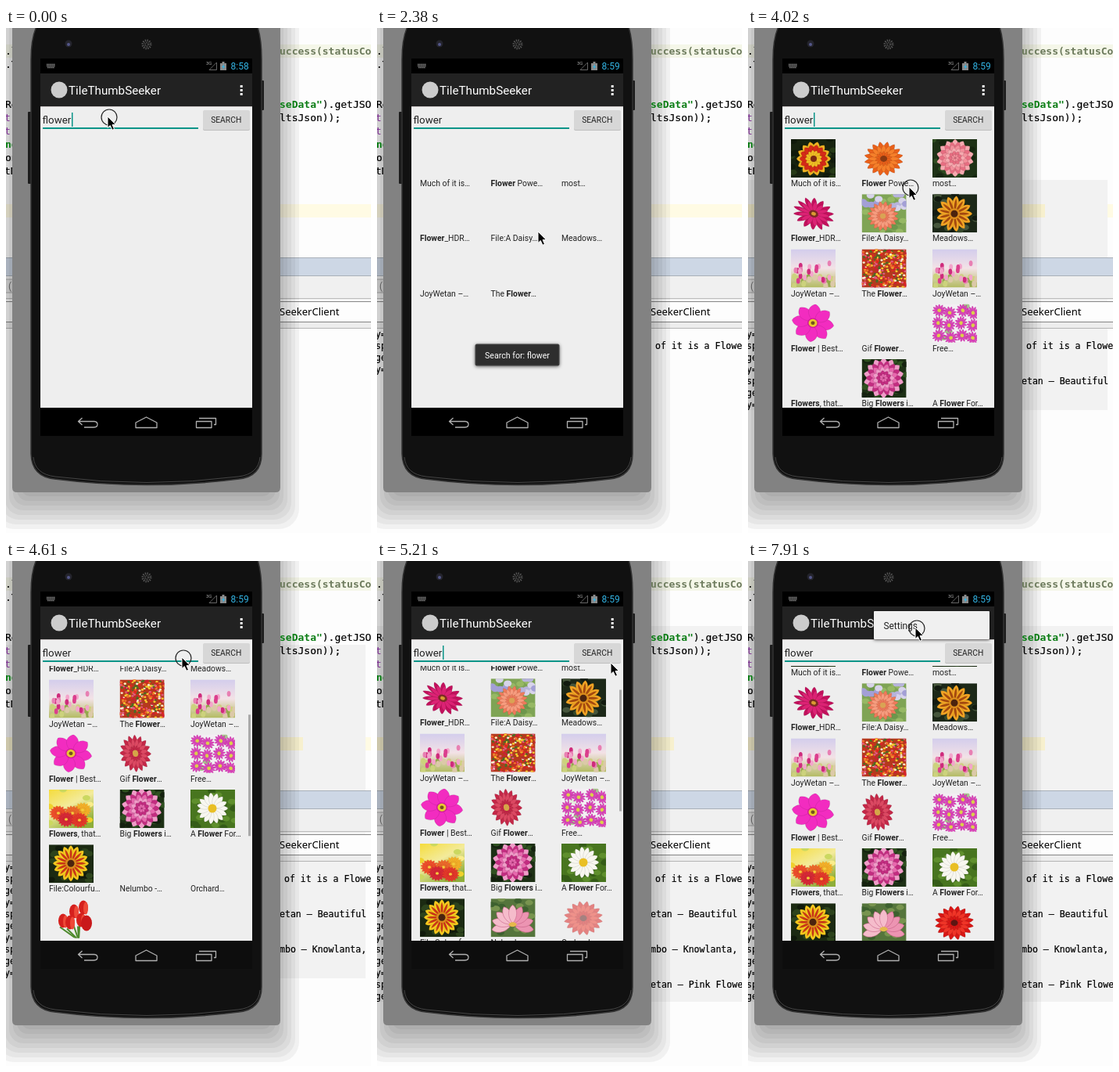
Write an HTML page that moves like this. It is 467x645 px and loops after 8 s.

```html
<!DOCTYPE html>
<html lang="en">
<head>
<meta charset="utf-8">
<title>Image search on a phone</title>
<style>
html, body { margin: 0; width: 100%; height: 100%; overflow: hidden; background: #fdfdfd; }
svg { display: block; width: 467px; height: 645px; font-family: Roboto, sans-serif; fill: #222; }
.code, .log { fill: #000; stroke: #000; stroke-width: .2; }
.code { font: 13px "DejaVu Sans Mono", monospace; }
.log { font: 11.55px "DejaVu Sans Mono", monospace; }
.str { font-weight: bold; fill: #0a7d14; stroke: none; }
.key { fill: #7a2a90; stroke: none; }
.b { font-weight: 700; }
.line { fill: none; stroke: #b0b0b0; stroke-width: 1.3; stroke-linejoin: round; }
#toast, #menu { filter: drop-shadow(0 1px 2px rgba(0,0,0,.6)); }
</style>
</head>
<body>
<svg viewBox="0 0 467 645">
  <defs>
    <clipPath id="view"><rect x="44" y="134" width="271" height="351"/></clipPath>
    <clipPath id="cell"><rect width="57" height="49"/></clipPath>
    <linearGradient id="meadow" x2="0" y2="1">
      <stop stop-color="#d3cdec"/><stop offset=".5" stop-color="#f3e2e6"/><stop offset="1" stop-color="#b3bb62"/>
    </linearGradient>
    <linearGradient id="spring" x2=".6" y2="1">
      <stop stop-color="#f5dc3c"/><stop offset=".5" stop-color="#f3eb9c"/><stop offset="1" stop-color="#8eae3a"/>
    </linearGradient>
  </defs>

  <!-- editor behind the phone -->
  <rect width="467" height="645" fill="#fdfdfd"/>
  <rect y="21" width="467" height="17" fill="#f5f7e9"/>
  <rect y="225" width="467" height="17" fill="#fffbe4"/>
  <g id="shade">
    <rect id="pane" fill="#f2f2f2"/>
    <rect y="225" width="380" height="17" fill="#f7f0ce"/>
  </g>
  <rect y="293" width="467" height="24" fill="#cdd7e5"/>
  <path d="M0 293.5H467M0 316.5H467" stroke="#a9b0b9"/>
  <rect y="317" width="467" height="30" fill="#f0f0f0"/>
  <path d="M0 345.5H467" stroke="#bbb"/>
  <rect y="349" width="467" height="27" fill="#fdfdfd"/>
  <rect y="376" width="467" height="8" fill="#ededed"/>
  <path d="M0 349.5H467M0 375.5H467" stroke="#858585"/>
  <path d="M0 383.5H467" stroke="#b5b5b5"/>
  <rect x="-4" y="321" width="30" height="17" rx="4" fill="#e2e2e2" stroke="#aaa"/>
  <text x="3" y="334" font-size="12" style="fill:#777">(</text>
  <g id="shadow"></g>
  <text x="350" y="367" style="font:13px 'Noto Sans',sans-serif;fill:#000">SeekerClient</text>
  <g class="code">
    <text x="350" y="34" style="fill:#6c7a5c;stroke:none;font-weight:bold">uccess(statusCo</text>
    <text x="350" y="102"><tspan class="str">seData"</tspan>).getJSO</text>
    <text x="350" y="119">ltsJson));</text>
    <text x="-1" y="34">.l</text><text x="-1" y="51">.T</text>
    <text x="-1" y="102">Re</text>
    <text x="-2" y="119" class="key">t</text><text x="-2" y="136" class="key">t</text>
    <text x="-1" y="153" class="str">ng</text>
    <text x="-1" y="170">on</text><text x="-2" y="187">tN</text>
  </g>
  <g id="logs" class="log"></g>

  <!-- phone -->
  <path d="M8-60H351V587Q351 593 345 593H14Q8 593 8 587Z" fill="#828282"/>
  <rect x="28" y="107" width="5" height="92" rx="1" fill="#1c1c1c"/>
  <rect x="326" y="67" width="4" height="38" rx="1" fill="#1c1c1c"/>
  <path d="M40-4Q32 12 32 40V544Q33 573 62 576Q180 591 298 576Q327 573 327 544V40Q327 12 321-4Z" fill="#111" stroke="#333" stroke-width="1.5"/>
  <path d="M35 548Q37 570 63 573Q180 588 297 573Q323 570 325 548" fill="none" stroke="#444"/>
  <circle cx="80" cy="20" r="4.5" fill="#24242c"/><circle cx="80" cy="21" r="2" fill="#54578a"/>
  <circle cx="180" cy="21" r="5" fill="none" stroke="#555" stroke-width="3" stroke-dasharray="1.3 1.3"/>
  <circle cx="180" cy="21" r="2" fill="none" stroke="#555" stroke-width="2" stroke-dasharray="1 1"/>

  <rect x="44" y="39" width="271" height="19" fill="#000"/>
  <path d="M52 46.5H63M52 48.5H63M53 50.5H62" stroke="#8a8a8a" stroke-width="1.4" stroke-dasharray="1.5 .6"/>
  <text x="256" y="47" font-size="6" style="fill:#aaa">3G</text>
  <path d="M260 53.5L269.5 44V53.5Z" fill="none" stroke="#666"/>
  <path d="M274 45H276.5V43H279.5V45H282V54H274Z" fill="#8a8a8a"/>
  <path d="M279 46L276 50H278L277 53L280.5 49H278.5Z" fill="#33b5e5"/>
  <text id="clock" x="287.5" y="53" font-size="12" style="fill:#33b5e5"></text>

  <rect x="44" y="58" width="271" height="42" fill="#222"/>
  <circle cx="68" cy="79" r="10.5" fill="#ccc"/>
  <text x="80" y="85" font-size="15.2" style="fill:#fff">TileThumbSeeker</text>
  <path d="M299.7 73h3v3h-3zM299.7 78h3v3h-3zM299.7 83h3v3h-3z" fill="#fff"/>

  <rect x="44" y="100" width="271" height="385" fill="#eee"/>
  <path d="M44 100.5H315" stroke="#c9c4c4"/>
  <text x="46.5" y="121.6" font-size="13.3">flower</text>
  <rect x="47" y="127" width="199" height="2" fill="#0b9488"/>
  <rect id="caret" x="84" y="108" width="1.5" height="18" fill="#0b9488"/>
  <rect x="252" y="106" width="60" height="25" rx="2" fill="#bfbfbf"/>
  <rect id="button" x="252" y="105" width="60" height="25" rx="2"/>
  <text x="281.7" y="121.3" font-size="10.3" text-anchor="middle">SEARCH</text>
  <g clip-path="url(#view)"><g id="grid" font-size="10.4"></g></g>
  <rect id="bar" x="310" width="3" height="155" fill="#aaa"/>

  <rect id="nav" x="44" y="485" width="271" height="36"/>
  <g class="line">
    <path d="M97.5 498L92.5 502.5L97.5 507M92.5 502.5H113Q117 503 117 506.2Q117 510 112 510H100"/>
    <path d="M166 504L179.5 497L193 504V510.5H166Z"/>
    <path d="M243.5 502.5H263V510.5H243.5ZM247 498.5H268.5V506.5H266"/>
  </g>

  <g id="toast">
    <rect x="126" y="404" width="107" height="27" rx="1.5" fill="#2e2e2e" stroke="#464646"/>
    <text x="179.5" y="422" font-size="10.6" text-anchor="middle" style="fill:#fff">Search for: flower</text>
  </g>
  <g id="menu">
    <rect x="161" y="64" width="148" height="36" rx="1" fill="#f0f0f0"/>
    <text x="173.5" y="87" font-size="11.9">Settings</text>
  </g>
  <g id="mouse">
    <circle id="ring" cx="2" cy="1" r="10" fill="none" stroke="#222" stroke-width="1.2"/>
    <path d="M0 0V14.5L3.3 11.5L5.9 17.3L8.5 16.1L6 10.6H10.5Z" fill="#000" stroke="#fff"/>
  </g>
</svg>
<script>
const $ = id => document.getElementById(id);
const set = (id, attrs) => { for (const k in attrs) $(id).setAttribute(k, attrs[k]); };
const show = (id, on) => set(id, { visibility: on ? 'visible' : 'hidden' });

let seed = 11;
const rnd = () => (seed = seed * 16807 % 2147483647) / 2147483647;
const times = (n, f) => Array.from({ length: n }, (_, i) => f(i)).join('');
const pick = list => list[Math.floor(rnd() * list.length)];

// the window shadow falls off in visible steps
$('shadow').innerHTML = times(8, i => {
  const grow = 24 - i * 5;
  return `<rect x="${8 - grow}" y="-80" width="${343 + 2 * grow}" height="${720 - i * 6}" rx="${26 - i * 2}" fill-opacity=".047" fill="#000"/>`;
});

// ---- pictures, each 57 x 49 ----
const bg = c => `<rect width="57" height="49" fill="${c}"/>`;
const dot = (x, y, rx, ry, c) => `<ellipse cx="${x.toFixed(1)}" cy="${y.toFixed(1)}" rx="${rx}" ry="${ry}" fill="${c}"/>`;
// a pointed petal lying on the x axis, from the centre out to r
const petal = (r, w) => `M${r * .12} 0C${r * .45} ${-w * 1.5} ${r * .85} ${-w * 1.2} ${r} 0C${r * .85} ${w * 1.2} ${r * .45} ${w * 1.5} ${r * .12} 0`;
const ring = (n, r, w, c, k) => n
  ? times(n, i => `<path d="${petal(r, w)}" fill="${c}" stroke="#000" stroke-opacity=".18" stroke-width=".5" transform="rotate(${(i + k * .5) * 360 / n})"/>`)
  : `<circle r="${r}" fill="${c}"/>`;
// layers: [petals, radius, petal half-width, colour]; no petals means a disc
const bloom = (x, y, layers, tilt = 0, sy = 1, size = 1) =>
  `<g transform="translate(${x} ${y}) rotate(${tilt}) scale(${size} ${size * sy})">${layers.map((l, k) => ring(...l, k)).join('')}</g>`;
const blur = (colors, n = 26) => times(n, () => dot(rnd() * 57, rnd() * 49, 5, 3.5, pick(colors)));

const dahlia = (a, b, c) => [[0, 16, 0, a], [14, 24, 5, c], [14, 21, 3.6, a], [12, 17, 3.6, b], [11, 13, 3, c], [9, 9, 2.4, a], [7, 5, 1.6, b]];
const gerbera = (a, b, mid) => [[0, 13, 0, a], [16, 25, 3.6, a], [16, 20, 2.8, b], [14, 11, 1.7, a], [0, 4.5, 0, mid]];
const gazania = (n, a, stripe) => [[n, 23, 4, a], [0, 7, 0, a], [n, 19, 1.3, stripe], [0, 7, 0, '#d98a1b'], [0, 4.5, 0, '#4b230e']];
const aster = [[12, 9, 1.3, '#e040bd'], [0, 2.4, 0, '#dcd049']];
const meadow = () => bg('url(#meadow)')
  + times(18, () => dot(rnd() * 57, 35 + rnd() * 14, 3, 4, pick(['#ccd27c', '#93a84c', '#dcc9a8'])))
  + times(20, () => dot(5 + rnd() * 50, 17 + rnd() * 24, 2.4, 3.7, pick(['#db3f8d', '#e880b3', '#cf2b7c', '#f3a5cb'])));
const field = () => bg('#b5391d')
  + times(330, () => dot(rnd() * 57, rnd() * 49, 1.6, 1.3, pick(['#e0281f', '#f6cc30', '#cc1c38', '#f8ecd0', '#4e6a24', '#f0702a', '#e05a80'])));
const asters = () => bg('#f4eff4') + blur(['#a9c48e', '#e6ecde'], 6)
  + times(12, i => bloom(6 + i % 4 * 15 + rnd() * 3, 8 + Math.floor(i / 4) * 16 + i % 2 * 3, aster, i * 19, .9));
const spring = () => bg('url(#spring)') + blur(['#f9ed8b', '#efd12c', '#cbd860'], 14)
  + [[12, 30, '#f0502c'], [43, 26, '#f6b22a'], [30, 30, '#ee6a2c'], [22, 38, '#d92a38'], [39, 39, '#e63a2c']]
    .map(([x, y, c]) => bloom(x, y, gerbera(c, c, '#f6cc3c'), 0, .85, .46)).join('');
const lotus = () => bg('#55753c') + blur(['#78944f', '#3d612f'])
  + [-100, 100, -75, 75, -50, 50, -25, 25, 0].map((a, i) =>
    `<path d="${petal(27, 5)}" fill="${i % 2 ? '#ec94b2' : '#f5bccb'}" stroke="#c25b82" stroke-width=".5" transform="translate(28 35) rotate(${a - 90})"/>`).join('')
  + dot(28, 33, 5, 3, '#e6b94c');
const tulips = () => [[-10, 27], [4, 15], [16, 10], [-1, 29], [13, 26]].map(([a, y]) =>
  `<path d="M${24 + a} ${y + 8}L38 52" stroke="#4d8a2c" stroke-width="2"/>`
  + dot(28 + a, y, 6, 9, '#d5201d') + dot(31 + a, y + 1, 3, 8, '#ee4a38')).join('') + dot(48, 30, 7, 10, '#c9191b');

const pics = [
  bg('#17230f') + blur(['#263a17', '#101a0b']) + bloom(29, 25, [[14, 22, 4.6, '#eeb222'], [0, 9, 0, '#d52a18'], [14, 18, 4, '#d52a18'], [13, 11, 2.4, '#f0bd24'], [0, 4, 0, '#7c2a12']]),
  bloom(28, 25, gerbera('#e9601a', '#f67f2a', '#8a3a12'), 0, .88),
  bg('#1e3216') + blur(['#2e4c20', '#16260f']) + bloom(29, 24, dahlia('#e86e82', '#f48f9b', '#f7aab0')),
  bloom(29, 25, [[14, 27, 3.4, '#c2105c'], [13, 21, 2.8, '#dc2274'], [0, 6, 0, '#7d2c23'], [0, 3, 0, '#d99a30']], 20, .74),
  bg('#7fa455') + blur(['#6d964c', '#96b864'], 18) + times(14, () => dot(rnd() * 57, rnd() * 18, 5, 4, pick(['#b7b3dc', '#d7d3ea', '#a39fd6'])))
    + bloom(27, 28, gerbera('#ee7a5a', '#f79c7e', '#d9a354'), 0, .95, .8),
  bg('#1c2818') + blur(['#34482b', '#121a10', '#46563c']) + bloom(28, 25, gazania(13, '#f2a424', '#a8480f')),
  meadow(), field(), '',
  bloom(28, 24, [[8, 27, 7.5, '#f22cc0'], [0, 7, 0, '#d0189a'], [0, 5.5, 0, '#e9c831'], [0, 2.5, 0, '#75511d']], 8, .9),
  bloom(20, 24, gerbera('#c42848', '#dc4862', '#d5a548'), -12, 1.2, .8),
  asters(), spring(),
  bg('#1d3015') + blur(['#2f5120', '#14210f']) + bloom(28, 24, dahlia('#c42c81', '#e868ae', '#f09cc8'), 0, 1, 1.08),
  bg('#48751f') + blur(['#5f8f2d', '#355c18']) + bloom(28, 24, [[15, 20, 3.4, '#f8f7f0'], [0, 5.5, 0, '#e9bf24']]),
  bg('#1b2a12') + blur(['#2c431c', '#101a0b']) + bloom(28, 24, gazania(16, '#f6c81e', '#cf3418')),
  lotus(),
  bloom(28, 25, gerbera('#d81715', '#f03427', '#5c1512'), 0, .88),
  tulips()
];
pics[8] = pics[6];

const labels = ['Much of it is…', '*Flower* Powe…', 'most…', '*Flower*_HDR…', 'File:A Daisy…', 'Meadows…',
  'JoyWetan –…', 'The *Flower*…', 'JoyWetan –…', '*Flower* | Best…', 'Gif *Flower*…', 'Free…',
  '*Flowers*, that…', 'Big *Flowers* i…', 'A *Flower* For…', 'File:Colourfu…', 'Nelumbo -…', 'Orchard…', 'Red…'];

// step at which each picture and label arrives
const picAt = i => i < 3 ? 17 : i < 6 ? 18 : i < 8 ? 19 : i == 10 || i == 12 || i == 14 ? 28 : i < 14 ? 25 : i == 16 ? 33 : i == 17 ? 35 : 30;
const labelAt = i => i < 8 ? 14 : i < 15 ? 25 : 29;

$('grid').innerHTML = labels.map((text, i) => {
  const x = [55, 145.6, 236][i % 3], y = 142 + Math.floor(i / 3) * 70.25;
  const rich = text.replace(/\*(.+?)\*/g, '<tspan class="b">$1</tspan>');
  return `<g transform="translate(${x} ${y})"><g id="p${i}" clip-path="url(#cell)">${pics[i]}</g><text id="l${i}" y="60">${rich}</text></g>`;
}).join('');

// ---- console ----
const logs = [[10, 'y='], [13, 'sp', 'of it is a Flowe', 356], [13, 'ge'], [14, 'y='],
  [25, 'sp', 'etan – Beautiful', 350], [25, 'ge'], [26, 'y='],
  [29, 'sp', 'mbo – Knowlanta,', 350], [29, 'ge'], [30, 'y='],
  [33, 'sp', 'etan – Pink Flowe', 350], [33, 'ge']];
$('logs').innerHTML = logs.map(([, a, b = '', x = 350], i) =>
  `<g id="g${i}"><text x="-2" y="${395 + i * 15}">${a}</text><text x="${x}" y="${395 + i * 15}">${b}</text></g>`).join('');

// ---- motion: tables start with the step number ----
const STEP = 149, LOOP = 8000;
const mouse = [[0, 130, 113], [1, 131, 114], [4, 235, 98], [5, 313, 95], [6, 300, 104], [8, 283, 113], [10, 283, 114],
  [16, 206, 260], [23, 206, 260], [27, 206, 203], [31, 225, 123], [32, 227, 126], [33, 236, 178], [35, 299, 130],
  [38, 302, 83], [44, 302, 83], [49, 213, 86], [50, 214, 85]];
const scroll = [[27, 0], [28, 24], [30, 102], [31, 131], [32, 134], [33, 98], [35, 62], [36, 58], [37, 56]];
const clicks = [[0, 0], [8, 9], [27, 33], [43, 43], [53, 60]];

function at(table, n) {
  const i = table.findIndex(r => r[0] > n);
  if (i < 0) return table[table.length - 1].slice(1);
  if (!i) return table[0].slice(1);
  const a = table[i - 1], b = table[i], k = (n - a[0]) / (b[0] - a[0]);
  return a.slice(1).map((v, j) => v + (b[j + 1] - v) * k);
}

function draw(n) {
  const [mx, my] = at(mouse, n), [top] = at(scroll, n);
  set('mouse', { transform: `translate(${mx.toFixed(1)} ${my.toFixed(1)})` });
  show('ring', clicks.some(([a, b]) => n >= a && n <= b));
  show('caret', n < 44 && Math.floor((n * STEP + 230) / 500) % 2 == 0);
  $('clock').textContent = n < 12 ? '8:58' : '8:59';
  set('button', { fill: n == 8 || n == 9 ? '#bcbcbc' : '#d7d7d7' });
  set('grid', { transform: `translate(0 ${-top})` });
  labels.forEach((_, i) => {
    show('l' + i, n >= labelAt(i));
    set('p' + i, { opacity: Math.max(0, Math.min(1, (n - picAt(i) + 1) / 2)) });
  });
  logs.forEach((l, i) => show('g' + i, n >= l[0]));
  set('bar', { y: 136 + top * .46, opacity: n < 28 || n > 39 ? 0 : n > 38 ? .4 : 1 });
  const [y0, y1, w] = n < 28 ? [194, 488, 460] : n < 32 ? [107, 533, 460] : [83, 563, 467];
  set('pane', { y: y0, width: w, height: y1 - y0 });
  show('shade', n >= 24);
  set('nav', { fill: n < 28 ? '#000' : '#0d0d0d' });
  show('toast', n >= 10 && n < 26);
  show('menu', n >= 44);
}

let last = -1;
const start = performance.now();
function tick() {
  const t = (performance.now() - start) % LOOP;
  const n = Math.floor(t / STEP + .08);
  if (n != last) draw(last = n);
  requestAnimationFrame(tick);
}
tick();
</script>
</body>
</html>
```
